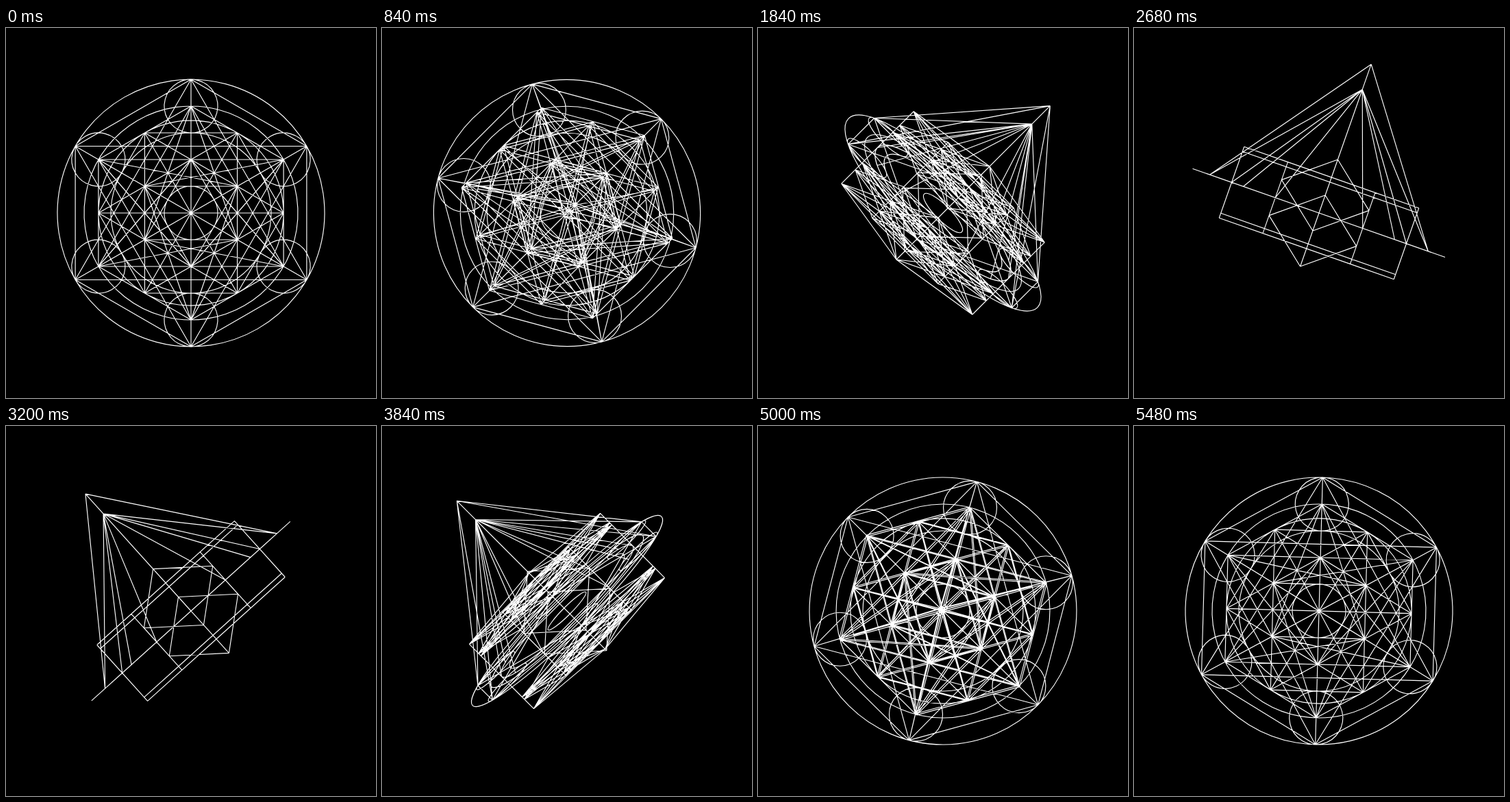
Recreate the animation shown at these times as an HTML page with a canvas. Size 540 by 540 pixels, loop 5520 ms.

```html
<!DOCTYPE html>
<html>
<head>
<meta charset="utf-8">
<style>
  html, body { margin: 0; height: 100%; overflow: hidden; background: #000; }
  canvas { display: block; }
</style>
</head>
<body>
<canvas id="stage" width="540" height="540"></canvas>
<script>
(() => {
  const ctx = document.getElementById('stage').getContext('2d');
  const LOOP = 5520, FRAME = 40, U = 39, RAD = Math.PI / 180;
  const MID = 2 * Math.sqrt(3) * U;
  const lines = [], circles = [];

  const hex = (r, turn, z) => Array.from({ length: 6 }, (_, i) => {
    const a = (turn + 60 * i) * RAD;
    return [r * Math.cos(a), r * Math.sin(a), z];
  });
  const join = (a, b) => lines.push([a, b]);
  const joinAll = pts => pts.forEach((p, i) => pts.slice(i + 1).forEach(q => join(p, q)));
  const fan = (apex, pts) => pts.forEach(p => join(apex, p));

  // Two parallel layers of the full star, tied together by posts
  const depth = U * Math.SQRT2;
  const layer = z => [...hex(4 * U, 30, z), ...hex(2 * U, 30, z)];
  const upper = layer(depth), lower = layer(-depth);
  joinAll(upper);
  joinAll(lower);
  upper.forEach((p, i) => join(p, lower[i]));

  const inner = MID / Math.sqrt(8);
  joinAll(hex(MID, 0, inner));
  joinAll(hex(MID, 0, -inner));

  // Small cube standing on its corner
  const corner = 1.5 * U * Math.SQRT2;
  const belt = hex(2 * U, 30, 0).map(([x, y], i) => [x, y, (i % 2 ? 1 : -1) * corner / 3]);
  belt.forEach((p, i) => {
    join(p, belt[(i + 1) % 6]);
    join(p, [0, 0, i % 2 ? corner : -corner]);
  });

  // Flat outer star and the pyramids above it
  const outer = hex(5 * U, 30, 0);
  outer.forEach((p, i) => {
    join(p, outer[(i + 1) % 6]);
    join(p, outer[(i + 2) % 6]);
  });
  const peak = MID * Math.SQRT2;
  fan([0, 0, peak + U], outer);
  fan([0, 0, peak], [...outer, ...hex(MID, 0, 0), ...hex(MID, 30, 0)]);

  for (const r of [5 * U, 4 * U, MID, 3 * U, U]) circles.push([0, 0, r]);
  for (const [x, y] of hex(4 * U, 30, 0)) circles.push([x, y, U]);

  // Sine ease from 0 to 1 between two times
  const ease = (t, from, to) => {
    const k = Math.min(1, Math.max(0, (t - from) / (to - from)));
    return (1 - Math.cos(Math.PI * k)) / 2;
  };

  function draw(t) {
    const tilt = 90 * (ease(t, 579, 2325) - ease(t, 3510, 5130)) * RAD;
    const roll = (75 - 30 * ease(t, -600, 600) - 90 * ease(t, 2325, 3315)
      - 30 * ease(t, LOOP - 600, LOOP + 600)) * RAD;
    const c = Math.cos(tilt), s = Math.sin(tilt);
    const height = p => -(p[1] * c + p[2] * s);

    ctx.setTransform(1, 0, 0, 1, 0, 0);
    ctx.fillStyle = '#000';
    ctx.fillRect(0, 0, 540, 540);
    ctx.translate(270, 270);
    ctx.rotate(roll);
    ctx.strokeStyle = '#fff';
    ctx.lineWidth = 1.15;
    ctx.beginPath();
    for (const [a, b] of lines) {
      ctx.moveTo(a[0], height(a));
      ctx.lineTo(b[0], height(b));
    }
    for (const [x, y, r] of circles) {
      ctx.moveTo(x + r, -y * c);
      ctx.ellipse(x, -y * c, r, r * Math.abs(c), 0, 0, 2 * Math.PI);
    }
    ctx.stroke();
  }

  const start = performance.now();
  function tick() {
    const t = (performance.now() - start) % LOOP;
    draw(Math.floor(t / FRAME) * FRAME);
    requestAnimationFrame(tick);
  }
  tick();
})();
</script>
</body>
</html>
```
